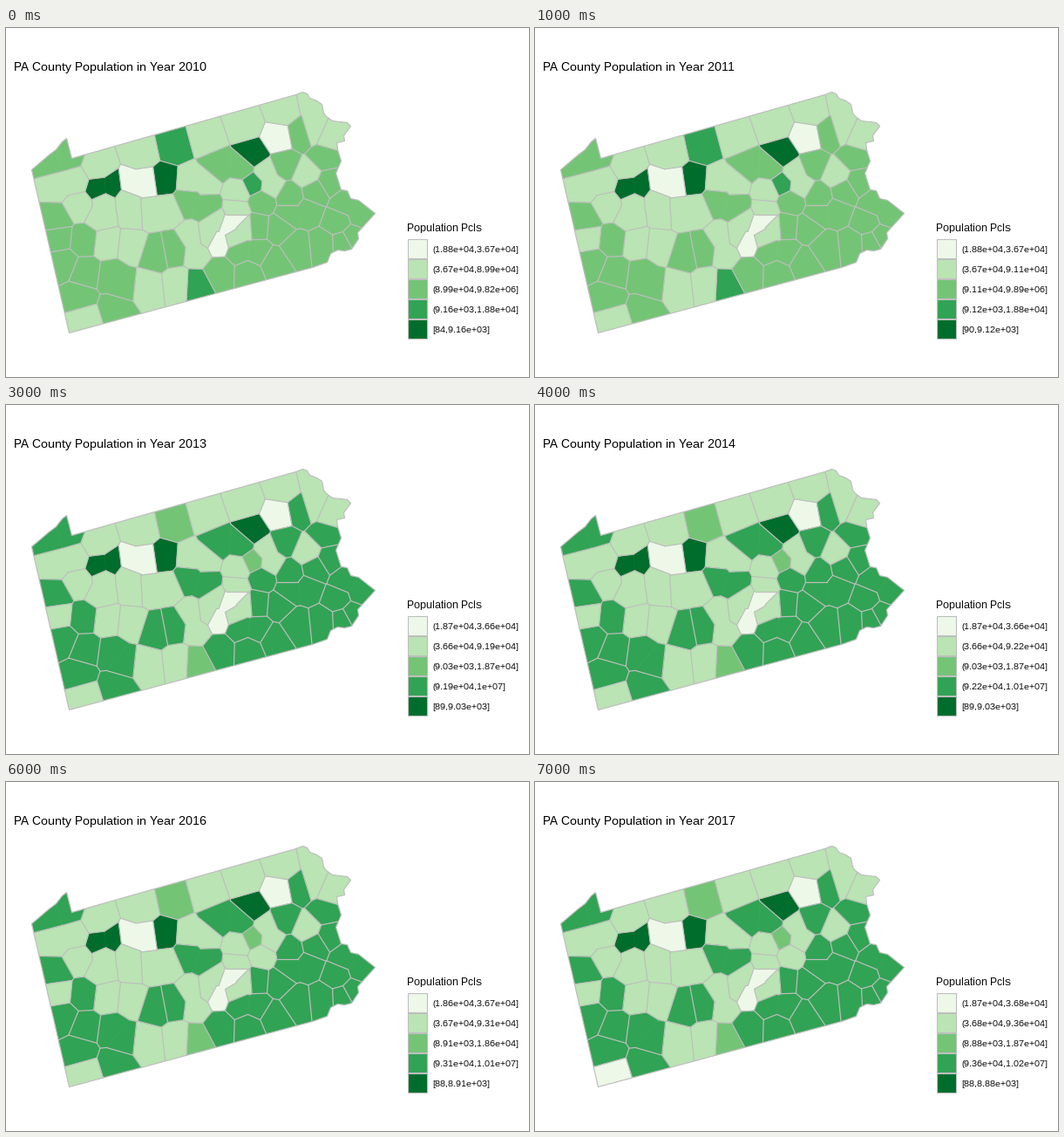
These frames come from a looping animation (600x400 px, 8 s). A matplotlib script:

```python
import matplotlib.pyplot as plt
from matplotlib.animation import FuncAnimation
from matplotlib.collections import LineCollection, PolyCollection
from matplotlib.patches import Polygon, Rectangle

plt.rcParams["font.family"] = "Liberation Sans"
plt.rcParams["text.hinting"] = "native"
plt.rcParams["text.hinting_factor"] = 1

W, H, DPI = 600, 400, 100
PX = 72 / DPI
GREENS = ["#EDF8E9", "#BAE4B3", "#74C476", "#31A354", "#006D2C"]
GREY = "#BEBEBE"

# Population quintile cuts per year: minimum, 20, 40, 60, 80 %, maximum
CUTS = {
    2010: (84, 9160, 18800, 36700, 89900, 9.82e6),
    2011: (90, 9120, 18800, 36700, 91100, 9.89e6),
    2012: (86, 9080, 18800, 36600, 91600, 9.96e6),
    2013: (89, 9030, 18700, 36600, 91900, 1.00e7),
    2014: (89, 9030, 18700, 36600, 92200, 1.01e7),
    2015: (88, 8940, 18600, 36700, 92400, 1.01e7),
    2016: (88, 8910, 18600, 36700, 93100, 1.01e7),
    2017: (88, 8880, 18700, 36800, 93600, 1.02e7),
}
YEARS = list(CUTS)

# State outline: lake shore, north line, river, south line
SHORE = [(29, 162), (49, 145), (57, 139), (64, 130), (69, 126), (75, 149)]
RIVER = [(332, 76), (340, 73), (345, 75), (348, 80), (356, 83), (362, 87),
         (364, 97), (367, 101), (374, 106), (391, 108), (395, 112),
         (387, 123), (388, 129), (379, 131), (380, 139), (384, 152),
         (378, 166), (384, 185), (391, 186), (395, 195), (404, 197),
         (423, 212), (403, 234), (404, 241), (396, 253), (388, 255),
         (380, 254), (372, 258), (368, 268), (351, 274)]
OUTLINE = SHORE + RIVER + [(72, 349)]

# Counties are the areas nearest to their one or more centres
TOP = [
    [(50, 153), (70, 147)], [(56, 219)], [(89, 243)], [(64, 269)],
    [(91, 280)], [(83, 308)], [(121, 284), (133, 294)], [(125, 322)],
    [(171, 258)], [(192, 254)], [(208, 197), (230, 205)],
    [(243, 159), (270, 160)], [(319, 156)], [(338, 121)], [(365, 147)],
    [(371, 177)], [(355, 187)], [(325, 193)], [(325, 212), (346, 210)],
    [(388, 200), (407, 213)], [(379, 222)], [(397, 240)], [(386, 246)],
    [(363, 247)], [(313, 229)], [(333, 250)], [(287, 227)], [(306, 268)],
    [(268, 255), (288, 257)], [(278, 280)], [(245, 279)],
]
UPPER = [
    [(57, 180), (78, 175)], [(104, 159)], [(155, 143)], [(84, 203)],
    [(113, 198), (108, 215)], [(137, 196), (146, 211)], [(115, 246)],
    [(143, 249)], [(164, 210), (185, 207)], [(161, 297)], [(198, 293)],
    [(214, 240), (218, 257)], [(230, 238), (240, 221)], [(264, 209)],
    [(266, 186)], [(262, 240), (274, 228)], [(210, 176), (229, 176)],
    [(229, 125)], [(273, 110)], [(317, 94)], [(354, 86), (351, 117)],
    [(371, 126)], [(297, 165), (303, 180)], [(345, 167)],
]
MIDDLE = [[(160, 177), (143, 180)], [(312, 126)],
          [(264, 218), (254, 226), (243, 245)]]
LOWER = [[(192, 135)], [(283, 178)], [(217, 294)]]
BOTTOM = [[(107, 184), (120, 183)], [(181, 174)], [(283, 145)]]

# Shrinking counties: centre, first quintile, year of the drop by one
SHRINKING = [((59, 240), 4, 2011), ((293, 198), 4, 2016),
             ((90, 333), 3, 2017)]

seeds, owners, ranks = [], [], []  # ranks: (quintile, drop year) per county


def add_county(centres, quintile, drop=9999):
    for x, y in centres:
        seeds.append(complex(x, y))
        owners.append(len(ranks))
    ranks.append((quintile, drop))


for level, group in enumerate([BOTTOM, LOWER, MIDDLE, UPPER, TOP]):
    for centres in group:
        add_county(centres, level)
for centre, level, drop in SHRINKING:
    add_county([centre], level, drop)


def cut(cell, seed, other, owner):
    """Keep the part of a cell nearer to seed; tag the new edge with owner."""
    mid, normal = (seed + other) / 2, other - seed
    side = [((p - mid) * normal.conjugate()).real for p, _ in cell]
    out = []
    for k, (p, tag) in enumerate(cell):
        n = (k + 1) % len(cell)
        a, b = side[k], side[n]
        if a <= 0:
            out.append((p, tag))
        if (a <= 0) != (b <= 0):
            cross = p + (cell[n][0] - p) * a / (a - b)
            out.append((cross, owner if a <= 0 else tag))
    return out


cells, borders = [], []
for seed, owner in zip(seeds, owners):
    cell = [(p, owner) for p in (0, W, W + H * 1j, H * 1j)]
    for other, other_owner in zip(seeds, owners):
        if other != seed:
            cell = cut(cell, seed, other, other_owner)
    pts = [(p.real, p.imag) for p, _ in cell]
    cells.append(pts)
    for k, (_, tag) in enumerate(cell):
        if tag > owner:
            borders.append([pts[k], pts[(k + 1) % len(pts)]])

fig = plt.figure(figsize=(W / DPI, H / DPI), dpi=DPI, facecolor="white")
ax = fig.add_axes([0, 0, 1, 1])
ax.set_xlim(-0.5, W - 0.5)
ax.set_ylim(H - 0.5, -0.5)
ax.axis("off")

state = Polygon(OUTLINE, closed=True, fill=False, ec=GREY, lw=1.2 * PX,
                joinstyle="round", zorder=3)
ax.add_patch(state)
areas = PolyCollection(cells, edgecolors="face", linewidths=0.6 * PX)
lines = LineCollection(borders, colors=GREY, linewidths=1.2 * PX,
                       capstyle="round")
for part in (areas, lines):
    ax.add_collection(part, autolim=False)
    part.set_clip_path(state)


def label(x, y, px, text=""):
    return ax.text(x - 0.5, y - 0.5, text, fontsize=px * PX,
                   color="black", ha="left", va="baseline")


title = label(9, 49, 14)
label(460, 233, 12, "Population Pcls")
keys = []
for row, green in enumerate(GREENS):
    ax.add_patch(Rectangle((460, 241 + 23 * row), 22, 22, fc=green, ec=GREY,
                           lw=1.1 * PX))
    keys.append(label(489, 257 + 23 * row, 10))


def update(i):
    year = YEARS[i]
    cuts = [f"{v:.3g}" for v in CUTS[year]]
    bins = [("(" if k else "[") + f"{cuts[k]},{cuts[k + 1]}]"
            for k in range(5)]
    # Colours follow the alphabetical order of the interval labels
    order = sorted(bins)
    title.set_text(f"PA County Population in Year {year}")
    for key, text in zip(keys, order):
        key.set_text(text)
    shades = [GREENS[order.index(bins[q - (year >= drop)])]
              for q, drop in ranks]
    areas.set_facecolor([shades[owner] for owner in owners])
    return []


anim = FuncAnimation(fig, update, frames=len(YEARS), interval=1000,
                     repeat=True, repeat_delay=0, blit=False)
plt.show()
```
